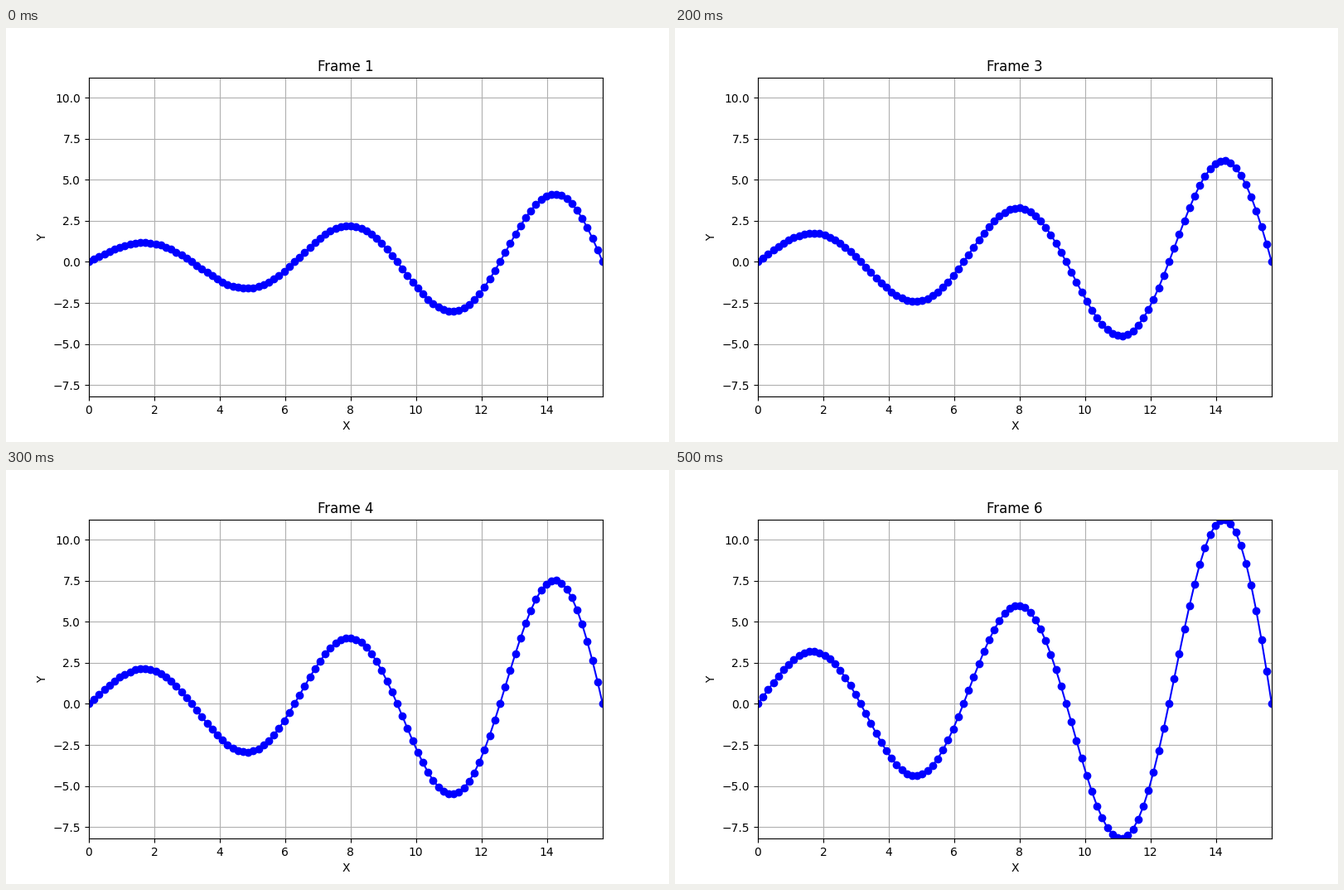
Write a matplotlib script that moves like this. It is 800 px wide and 500 px high and loops after 0.6 s.

```python
import numpy as np
import matplotlib.pyplot as plt
from matplotlib.animation import FuncAnimation

FRAMES = 6
INTERVAL = 100  # ms

x = np.linspace(0, 5 * np.pi, 101)


def wave(step):
    """Sine growing exponentially along x and with every step."""
    return np.exp(0.1 * x + 0.2 * step) * np.sin(x)


fig, ax = plt.subplots(figsize=(8, 5), dpi=100)
line, = ax.plot(x, wave(0), "bo-")
title = ax.set_title("Frame 1")
ax.set_xlabel("X")
ax.set_ylabel("Y")
ax.grid(True)

# The largest wave fills the axes exactly.
largest = wave(FRAMES - 1)
ax.set_xlim(x[0], x[-1])
ax.set_ylim(largest.min(), largest.max())


def update(step):
    line.set_ydata(wave(step))
    title.set_text(f"Frame {step + 1}")
    return line, title


anim = FuncAnimation(fig, update, frames=FRAMES, interval=INTERVAL, repeat=True)
plt.show()
```
